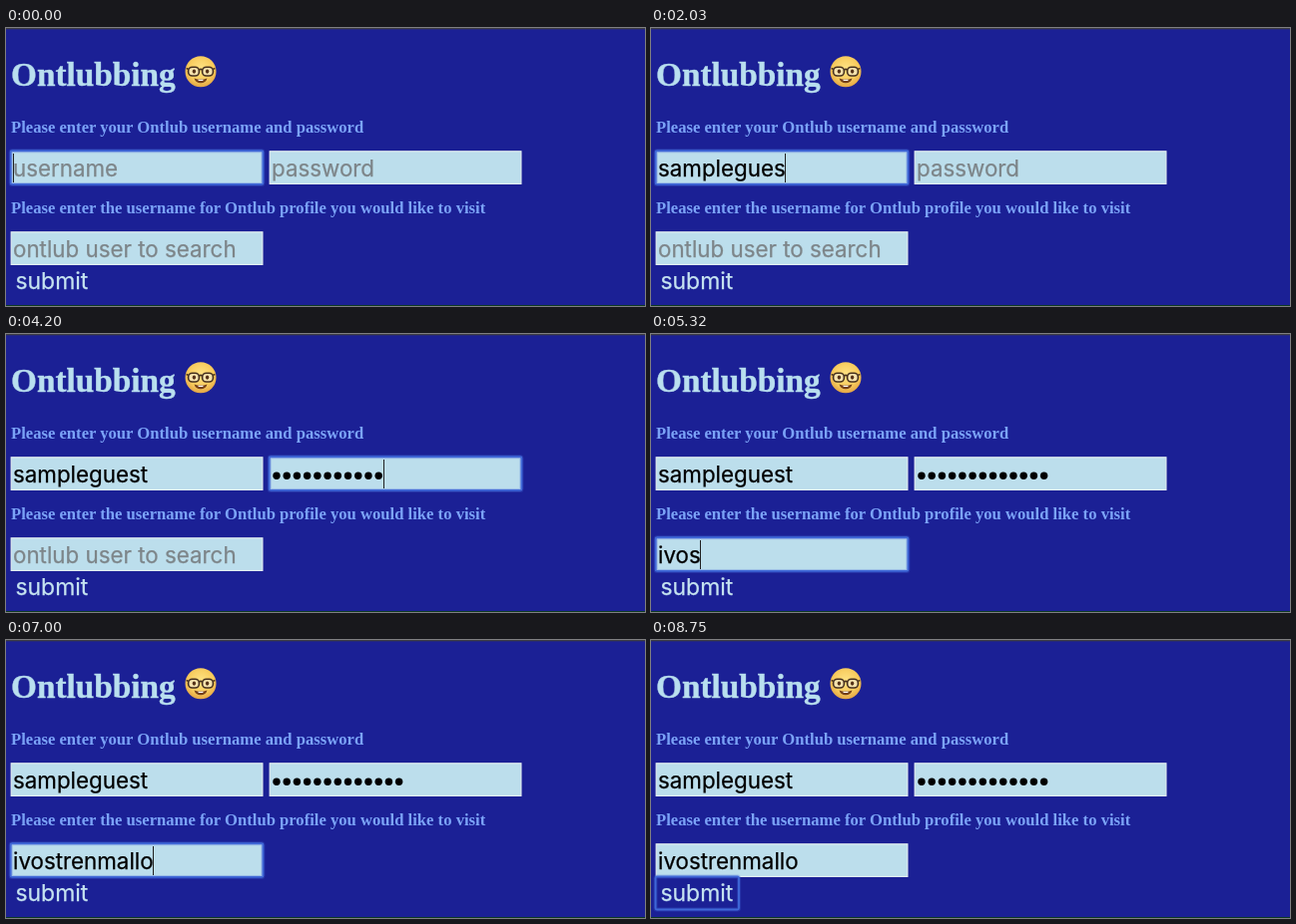
Recreate the animation shown at these times as an HTML page. Size 640 px wide and 279 px high, loop 8.89 s.

```html
<!DOCTYPE html>
<html lang="en">
<head>
<meta charset="utf-8">
<title>Login form</title>
<style>
html, body { margin: 0; width: 100%; height: 100%; overflow: hidden; background: #1b2095; }
svg { display: block; width: 640px; height: 279px; }
.serif { font: bold 16.64px "Liberation Serif", serif; fill: #7ba3f7; }
.title { font-size: 33.3px; fill: #b9dfef; stroke: #b9dfef; stroke-width: .4; }
.sans { font: 22.35px Inter, Roboto, sans-serif; white-space: pre; stroke-width: .25; }
.typed { fill: #000; stroke: #000; }
.hint { fill: #7d8589; stroke: #7d8589; }
.button { font-size: 22.9px; fill: #c6e4f1; stroke: #c6e4f1; }
.box { fill: #bcdeec; stroke: #e2edf1; stroke-width: 1.2; }
.ring { fill: none; stroke: #3f68d8; stroke-width: 1.9; }
.halo { fill: none; stroke: #3f68d8; stroke-width: 4; opacity: .3; }
</style>
</head>
<body>
<svg viewBox="0 0 640 279">
  <defs>
    <radialGradient id="skin" cx=".5" cy=".4" r=".62">
      <stop offset="0" stop-color="#fde284"/>
      <stop offset=".65" stop-color="#f8cb5c"/>
      <stop offset="1" stop-color="#e0a043"/>
    </radialGradient>
  </defs>
  <rect width="640" height="279" fill="#1b2095"/>
  <rect width="640" height="1.3" fill="#3b3b45"/>
  <rect y="278" width="640" height="1" fill="#0e3a24"/>

  <text class="serif title" x="5" y="58">Ontlubbing</text>
  <g transform="translate(195 43.8)">
    <circle r="15.5" fill="url(#skin)"/>
    <path d="M-6.5 6.6Q0 9 6.5 6.6Q5 11.4 0 11.4T-6.5 6.6Z" fill="#74401b"/>
    <path d="M-2.4 7.6Q0 8.2 2.4 7.6V9.3H-2.4Z" fill="#fff"/>
    <g fill="#f5e2ad" stroke="#46311f" stroke-width="1.6">
      <rect x="-12.4" y="-4.6" width="10.8" height="8.8" rx="4"/>
      <rect x="1.6" y="-4.6" width="10.8" height="8.8" rx="4"/>
      <path d="M-1.7-1.8Q0-3 1.7-1.8M-12.4-2.6L-14.4-3.2M12.4-2.6L14.4-3.2" fill="none"/>
    </g>
    <g fill="#55331a">
      <ellipse cx="-6.6" cy="-.2" rx="1.7" ry="2.1"/>
      <ellipse cx="6.6" cy="-.2" rx="1.7" ry="2.1"/>
    </g>
  </g>

  <text class="serif" x="5" y="105">Please enter your Ontlub username and password</text>
  <text class="serif" x="5" y="186">Please enter the username for Ontlub profile you would like to visit</text>
  <g id="form"></g>
  <text class="sans button" x="9.5" y="262">submit</text>
  <rect class="halo" id="halo"/>
  <rect class="ring" id="ring"/>
  <rect id="caret" width="1" height="29" fill="#222"/>
</svg>
<script>
const LOOP = 8890, BLINK = 500, KEY = 151, DOT = 10.22;
const $ = id => document.getElementById(id);

function set(el, attrs) {
  for (const k in attrs) el.setAttribute(k, attrs[k]);
  return el;
}
function add(tag, attrs) {
  const el = document.createElementNS('http://www.w3.org/2000/svg', tag);
  return $('form').appendChild(set(el, attrs));
}

// focus: moment the field is selected; start: moment of its first key
const fields = [
  { x: 5, y: 123.6, hint: 'username', value: 'sampleguest', focus: 0, start: 590 },
  { x: 264, y: 123.6, hint: 'password', value: '*'.repeat(13), secret: true, focus: 2420, start: 2630 },
  { x: 5, y: 204.6, hint: 'ontlub user to search', value: 'ivostrenmallo', focus: 4660, start: 4800 }
];
const SUBMIT = 7700;

for (const f of fields) {
  add('rect', { class: 'box', x: f.x + .2, y: f.y + .2, width: 251.7, height: 32.6 });
  f.text = add('text', { x: f.x + 2, y: f.y + 25.2 });
  if (f.secret) {
    f.dots = [...f.value].map((_, i) =>
      add('circle', { cx: f.x + 7 + i * DOT, cy: f.y + 18.6, r: 3.7 }));
  }
}

function show(f, n) {
  if (f.shown === n) return;
  f.shown = n;
  f.text.textContent = n ? (f.secret ? '' : f.value.slice(0, n)) : f.hint;
  set(f.text, { class: n ? 'sans typed' : 'sans hint' });
  if (f.dots) f.dots.forEach((d, i) => set(d, { visibility: i < n ? 'visible' : 'hidden' }));
}

function outline(x, y, width, height) {
  for (const id of ['ring', 'halo']) set($(id), { x, y, width, height, rx: 1.5 });
}

function draw(t) {
  let active;
  for (const f of fields) {
    const n = t < f.start ? 0 : Math.min(f.value.length, Math.floor((t - f.start) / KEY) + 1);
    show(f, n);
    if (t >= f.focus) active = f;
  }
  const onButton = t >= SUBMIT;
  if (onButton) outline(4.5, 237.5, 83.5, 33);
  else outline(active.x - .3, active.y - .3, 252.7, 33.6);

  const n = active.shown;
  const last = n ? active.start + (n - 1) * KEY : active.focus;
  const width = !n ? 0 : active.secret ? n * DOT : active.text.getComputedTextLength();
  set($('caret'), {
    x: Math.round(active.x + 1.6 + width),
    y: active.y + 2.4,
    visibility: !onButton && (t - last) % (2 * BLINK) < BLINK ? 'visible' : 'hidden'
  });
}

const begin = performance.now();
function tick(now) {
  draw(Math.max(0, now - begin) % LOOP);
  requestAnimationFrame(tick);
}
draw(0);
requestAnimationFrame(tick);
</script>
</body>
</html>
```
